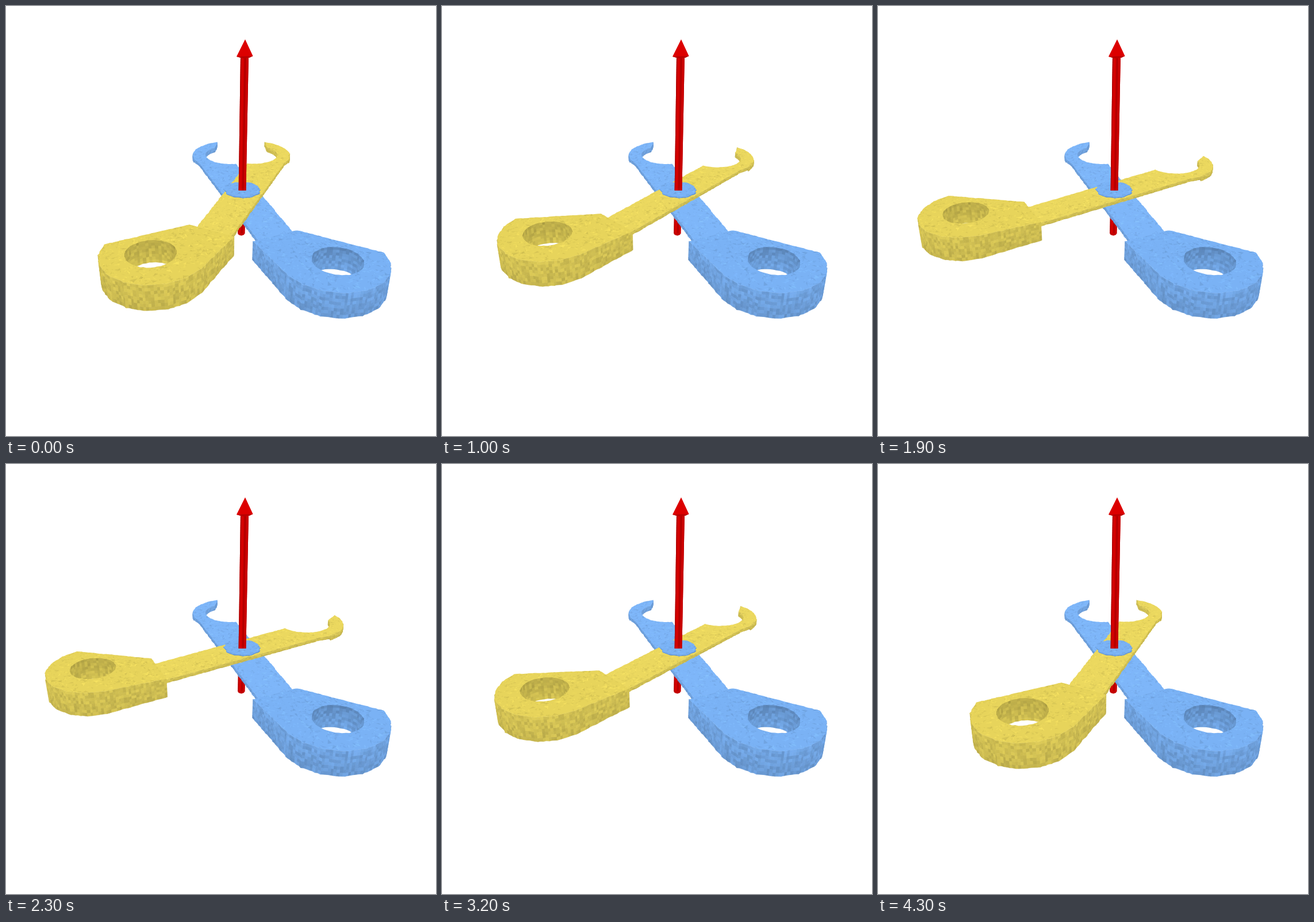
Recreate the animation shown at these times as an HTML page with a canvas. Size 748 by 748 pixels, loop 4400 ms.

```html
<!DOCTYPE html>
<html lang="en">
<head>
<meta charset="utf-8">
<title>Hinged tool</title>
<style>
html, body { margin: 0; width: 100%; height: 100%; overflow: hidden; background: #fff; }
canvas { display: block; width: 748px; height: 748px; }
</style>
</head>
<body>
<canvas id="stage" width="748" height="748"></canvas>
<script>
const ctx = document.getElementById('stage').getContext('2d');
const MID = 374, FOCAL = 954, SIN = 0.479, COS = 0.878;
const AXIS_X = 37, AXIS_Y = -55;
const STEP_MS = 100, STEPS = 44, SWING = 40;
const YELLOW_START = 31.5, BLUE_ANGLE = 28.9;
const YELLOW = [231, 212, 91], BLUE = [122, 178, 245];
const RAD = Math.PI / 180;

let seed = 7;
function rnd() {
  seed = (seed + 0x6D2B79F5) | 0;
  let t = Math.imul(seed ^ (seed >>> 15), 1 | seed);
  t = (t + Math.imul(t ^ (t >>> 7), 61 | t)) ^ t;
  return ((t ^ (t >>> 14)) >>> 0) / 4294967296;
}
const spread = n => (rnd() - 0.5) * 2 * n;
const tone = (rgb, k) => `rgb(${rgb.map(v => Math.min(255, Math.round(v * k))).join()})`;
const mix = (p, q, t) => p.map((v, i) => v + (q[i] - v) * t);

// World point: a to the right, b away from the viewer, h along the axis.
function project([a, b, h]) {
  const z = FOCAL + b * COS - h * SIN;
  return [
    MID + (AXIS_X + a) * FOCAL / z,
    MID + (AXIS_Y - b * SIN - h * COS) * FOCAL / z
  ];
}

// Tool space has y running down the handle; side -1 mirrors the tool.
function placer(deg, side) {
  const c = Math.cos(deg * RAD), s = Math.sin(deg * RAD);
  return ([x, y, h]) => project([-side * (x * c + y * s), x * s - y * c, h]);
}

function arc(cx, cy, r, from, to, n) {
  return Array.from({ length: n + 1 }, (_, i) => {
    const t = (from + (to - from) * i / n) * RAD;
    return [cx + r * Math.cos(t), cy + r * Math.sin(t)];
  });
}

const handleShape = [[1, 161], ...arc(-4, 254, 77, 14, 181, 8), [-75, 157]];
const armShape = [
  [-9, 162], ...arc(64, -154, 50, 107, 261, 12),
  ...arc(64, -154, 75, 278, 173, 9), [-68, 160]
];
const pivotShape = arc(0, 0, 31.5, 0, 330, 11);

// Splits edges into short pieces and roughens them slightly.
function roughen(pts, amount) {
  return pts.flatMap((p, i) => {
    const q = pts[(i + 1) % pts.length];
    const n = Math.max(1, Math.round(Math.hypot(q[0] - p[0], q[1] - p[1]) / 4));
    return Array.from({ length: n }, (_, k) => mix(p, q, k / n).map(v => v + spread(amount)));
  });
}

const cellRow = () => Array.from({ length: 8 }, () => spread(0.07));

function makeWall(rim, h, drop) {
  return {
    rim: rim.map(([x, y]) => [x, y, h]),
    base: rim.map(([x, y]) => [x, y, h - drop(Math.hypot(x, y))]),
    cells: rim.map(cellRow)
  };
}

function makePart({ shape, h, rgb, drop, hole, rough = 0.7 }) {
  const xs = shape.map(p => p[0]), ys = shape.map(p => p[1]);
  const x0 = Math.min(...xs), w = Math.max(...xs) - x0;
  const y0 = Math.min(...ys), d = Math.max(...ys) - y0;
  const chips = Array.from({ length: Math.round(w * d * 0.045) }, () => {
    const x = x0 + rnd() * w, y = y0 + rnd() * d, size = 2 + rnd() * 4;
    return {
      tri: [0, 1, 2].map(() => [x + spread(size), y + spread(size), h]),
      k: rnd() < 0.55 ? 0.87 + rnd() * 0.08 : 1.03 + rnd() * 0.07
    };
  });
  return {
    rgb, chips,
    wall: makeWall(roughen(shape, rough), h, drop),
    hole: hole && makeWall(roughen(arc(0, 257, 36, 0, 345, 23), 0.6), h, () => 38)
  };
}

function trace(pts) {
  ctx.beginPath();
  pts.forEach(([x, y]) => ctx.lineTo(x, y));
  ctx.closePath();
}

function fill(pts, color, seam) {
  trace(pts);
  ctx.fillStyle = color;
  ctx.fill();
  if (seam) {
    ctx.strokeStyle = color;
    ctx.lineWidth = 0.7;
    ctx.stroke();
  }
}

function area(pts) {
  return pts.reduce((sum, [x, y], i) => {
    const [nx, ny] = pts[(i + 1) % pts.length];
    return sum + x * ny - nx * y;
  }, 0);
}

function drawWall({ rim, base, cells }, rgb, shade, inner) {
  const way = Math.sign(area(rim)) * (inner ? -1 : 1);
  rim.forEach((p, i) => {
    const j = (i + 1) % rim.length, q = rim[j];
    if (area([p, q, base[j], base[i]]) * way >= 0) return;
    cells[i].forEach((bump, k) => {
      const s = k / cells[i].length, e = (k + 1) / cells[i].length;
      fill([mix(p, base[i], s), mix(q, base[j], s), mix(q, base[j], e), mix(p, base[i], e)],
        tone(rgb, shade(s) + bump), true);
    });
  });
}

function drawPart({ rgb, chips, wall, hole }, place) {
  const flatten = w => ({ rim: w.rim.map(place), base: w.base.map(place), cells: w.cells });
  const body = flatten(wall);
  drawWall(body, rgb, s => 0.91 - 0.05 * s);

  fill(body.rim, tone(rgb, 1));
  ctx.save();
  trace(body.rim);
  ctx.clip();
  ctx.globalAlpha = 0.65;
  chips.forEach(c => fill(c.tri.map(place), tone(rgb, c.k)));
  ctx.restore();

  if (!hole) return;
  const bore = flatten(hole);
  ctx.save();
  trace(bore.rim);
  ctx.clip();
  fill(bore.rim, tone(rgb, 0.86));
  drawWall(bore, rgb, s => 0.8 + 0.12 * s, true);
  fill(bore.base, '#fff');
  ctx.restore();
}

const handleDrop = r => Math.max(32, Math.min(40, 32 + (r - 170) * 0.07));
const armDrop = r => r > 170 ? 10 : 6;

function makeTool(rgb, armH, handleH) {
  return [
    makePart({ shape: armShape, h: armH, rgb: rgb.map(v => v + 4), drop: armDrop }),
    makePart({ shape: handleShape, h: handleH, rgb, drop: handleDrop, hole: true })
  ];
}

const blueTool = makeTool(BLUE, -1, -2);
const yellowTool = makeTool(YELLOW, 0, 6);
const pivot = makePart({ shape: pivotShape, h: 0, rgb: BLUE, drop: () => 1, rough: 1.3 });

function drawShaft(x1, y1, x2, y2, w1, w2) {
  const band = (s, e, color) => fill([
    [x1 + w1 * s, y1], [x1 + w1 * e, y1], [x2 + w2 * e, y2], [x2 + w2 * s, y2]
  ], color);
  band(-1, 1, '#d40000');
  band(-1, -0.75, '#b00000');
  band(-0.1, 0.45, '#b40000');
  band(0.7, 1, '#c20000');
}

function drawArrowFoot() {
  drawShaft(410.6, 335, 409.3, 396, 6.2, 6);
  fill([[403.3, 395], [415.3, 395], [414, 398], [409.5, 399.5], [404.5, 398]], '#c40000');
}

function drawArrow() {
  drawShaft(415, 86, 411, 321, 7, 6.4);
  fill([[416, 58], [429.5, 87], [423, 90], [412, 91], [401, 88]], '#dc0000');
  fill([[401, 88], [429.5, 87], [423, 90], [412, 91]], '#b80000');
}

function draw(step) {
  const swing = Math.min(step, STEPS - 1 - step) / (STEPS / 2 - 1) * SWING;
  const blue = placer(BLUE_ANGLE, -1), yellow = placer(YELLOW_START + swing, 1);
  ctx.fillStyle = '#fff';
  ctx.fillRect(0, 0, 748, 748);
  drawArrowFoot();
  blueTool.forEach(part => drawPart(part, blue));
  yellowTool.forEach(part => drawPart(part, yellow));
  drawPart(pivot, blue);
  drawArrow();
}

let shown = -1;
function tick() {
  const step = Math.floor(performance.now() / STEP_MS) % STEPS;
  if (step !== shown) draw(shown = step);
  requestAnimationFrame(tick);
}
tick();
</script>
</body>
</html>
```
